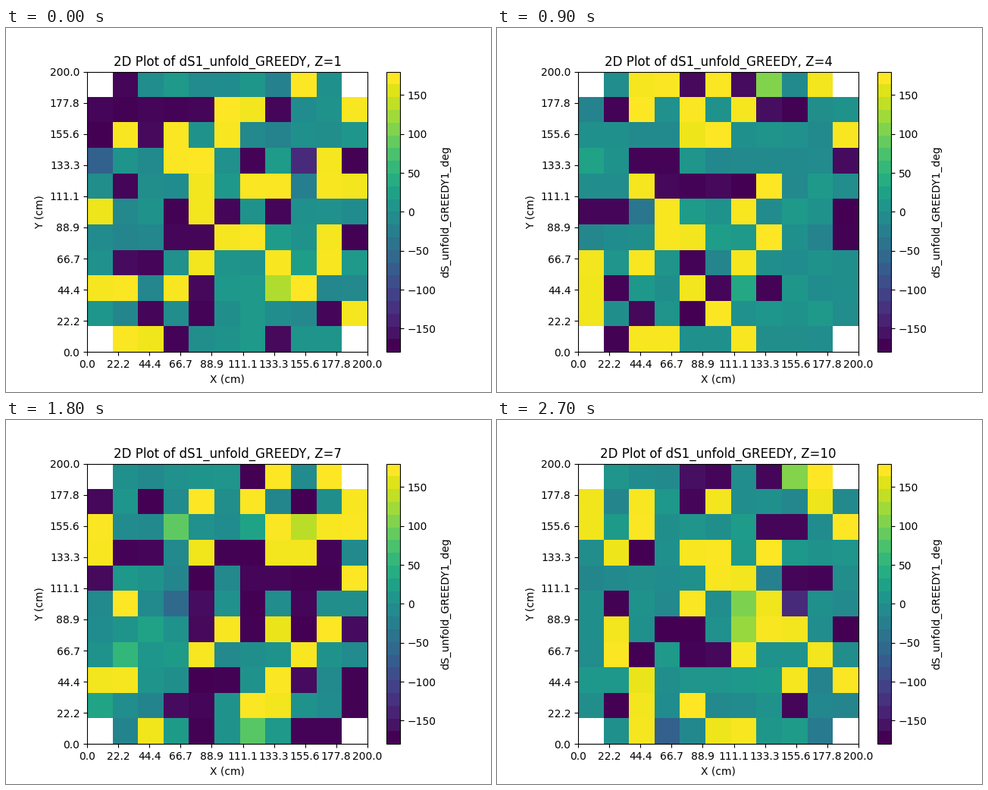
A matplotlib script that plays this animation: 640x480 px, repeating every 3000 ms.

```python
import matplotlib.pyplot as plt
import numpy as np
from matplotlib.animation import FuncAnimation
from matplotlib.cm import ScalarMappable
from matplotlib.colors import Normalize

LAYERS = 10
CELLS = 11
SIZE_CM = 200
NAME = "dS1_unfold_GREEDY"

plt.rcParams["font.family"] = "DejaVu Sans"


def layer_angles(z):
    """Angles in degrees: mostly near 0 or near +/-180, with a few strays."""
    rng = np.random.default_rng(100 + z)
    shape = (CELLS, CELLS)
    near_zero = rng.normal(0, 9, shape)
    near_turn = 180 - np.abs(rng.normal(0, 5, shape))
    stray = rng.uniform(-165, 160, shape)
    kind = rng.choice(4, size=shape, p=[0.51, 0.23, 0.20, 0.06])
    angles = np.choose(kind, [near_zero, near_turn, -near_turn, stray])
    angles[np.ix_([0, -1], [0, -1])] = np.nan
    return angles


fig, ax = plt.subplots(figsize=(6.4, 4.8), dpi=100)
norm = Normalize(-180, 180)
image = ax.imshow(layer_angles(1), cmap="viridis", norm=norm, origin="lower",
                  extent=(0, SIZE_CM, 0, SIZE_CM), interpolation="nearest")

bands = ScalarMappable(norm, plt.get_cmap("viridis", 22))
fig.colorbar(bands, ax=ax, label="dS_unfold_GREEDY1_deg")

ticks = np.linspace(0, SIZE_CM, 10)
labels = [f"{t:.1f}" for t in ticks]
ax.set_xticks(ticks, labels)
ax.set_yticks(ticks, labels)
ax.set_xlabel("X (cm)")
ax.set_ylabel("Y (cm)")
title = ax.set_title(f"2D Plot of {NAME}, Z=1")


def update(frame):
    z = frame + 1
    image.set_data(layer_angles(z))
    title.set_text(f"2D Plot of {NAME}, Z={z}")
    return image, title


animation = FuncAnimation(fig, update, frames=LAYERS, interval=300,
                          repeat=True, repeat_delay=0, blit=False)
plt.show()
```
